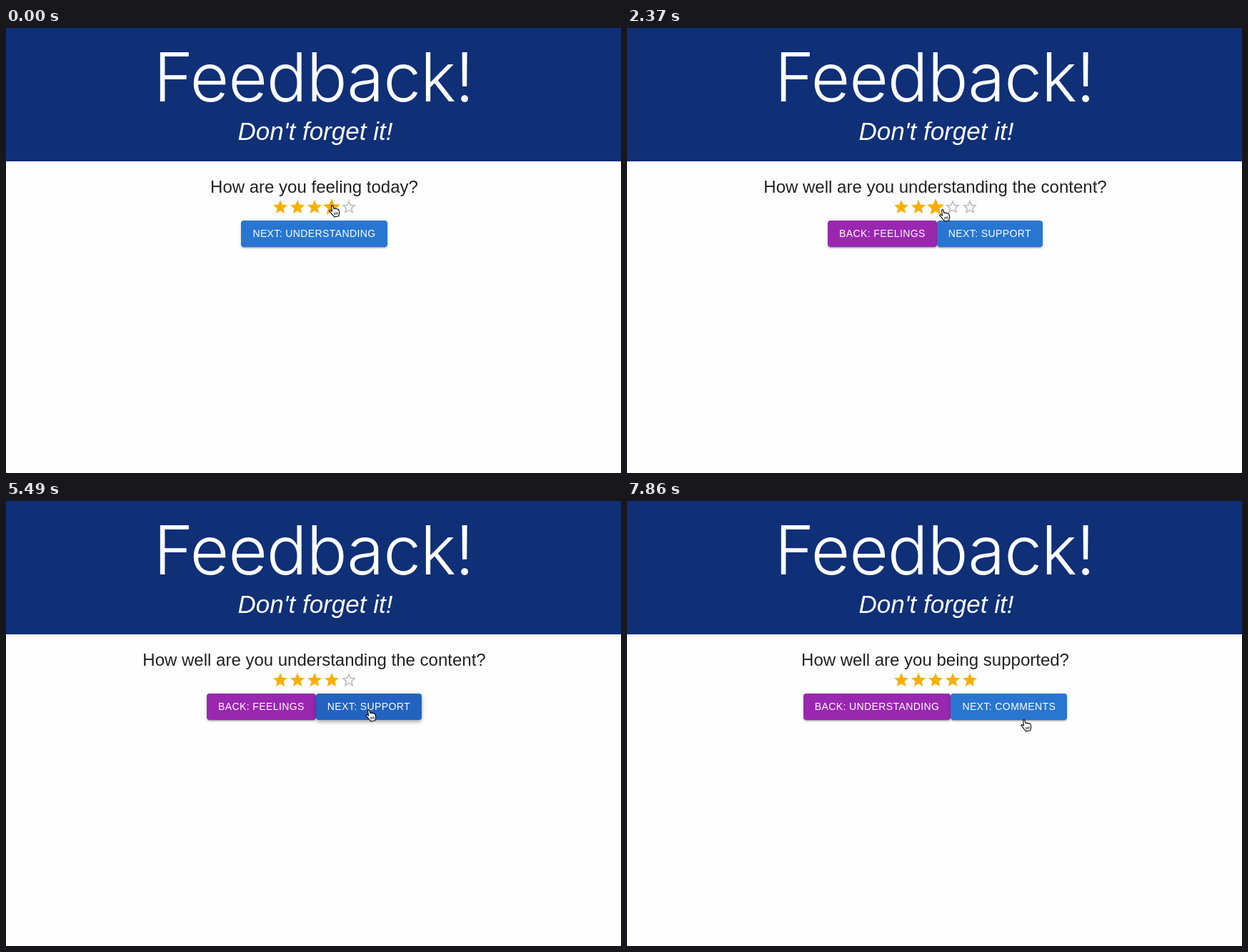
An HTML page for the animation above (8000 ms loop, 861 px wide and 624 px high).

```html
<!DOCTYPE html>
<html lang="en">
<head>
<meta charset="utf-8">
<title>Feedback</title>
<style>
  html, body { margin: 0; width: 100%; height: 100%; overflow: hidden; background: #fefefe; }
  #stage { position: relative; width: 861px; height: 624px; overflow: hidden; }
  svg { position: absolute; left: 0; top: 0; }
  text { text-anchor: middle; font-family: "Liberation Sans", Arial, sans-serif; }
  .title { font: 300 94.5px Inter, sans-serif; font-optical-sizing: none; letter-spacing: -1.1px; }
  .tagline { font-size: 35px; font-style: italic; }
  .question { font-size: 24px; }
  #buttons { position: absolute; left: 1px; top: 270px; width: 861px; display: flex; justify-content: center; }
  .button {
    --rest: #2876d2; --dark: #2363c0;
    box-sizing: border-box; height: 36.5px; padding: 6px 16px; border-radius: 4px;
    font: 14px/24.5px "Liberation Sans", Arial, sans-serif;
    letter-spacing: .4px; white-space: pre; color: #fff; background: var(--rest);
    box-shadow: 0 3px 1px -2px #0003, 0 2px 2px #00000024, 0 1px 5px #0000001f;
  }
  .button.lit {
    background: var(--dark);
    box-shadow: 0 2px 4px -1px #0003, 0 4px 5px #00000024, 0 1px 10px #0000001f;
  }
  .button:empty { display: none; }
  #back { --rest: #9a27b0; --dark: #8a22a5; }
</style>
</head>
<body>
<div id="stage">
  <svg width="861" height="624">
    <rect width="861" height="187" fill="#0f2f77"/>
    <text class="title" x="430.5" y="103" fill="#fff">Feedback!</text>
    <text class="tagline" x="433" y="157" fill="#fff">Don't forget it!</text>
    <text class="question" id="question" x="431.5" y="231" fill="#212121"></text>
    <g id="stars"></g>
  </svg>
  <div id="buttons">
    <div class="button" id="back"></div>
    <div class="button" id="next"></div>
  </div>
  <svg width="861" height="624">
    <g id="hand" stroke="#000" stroke-width="1.1" stroke-linejoin="round">
      <path fill="#fff" d="M-1.4 2.2c-.5-1.5 1.6-2.1 2.1-.7l1.5 4.2c.2-1 2-1 2.4.2c.4-.9 1.9-.8 2.2.4c.5-.6 1.7-.4 2 .8l.8 3.2c.4 1.7-.5 2.6-.6 4.1l-.1 1.3-6.3 1.3-.6-1.2c-1.3-1-2.6-2.3-3.6-4.1l-2.3-2.4c-1-1 .3-2.1 1.4-1.6l2 1.4z"/>
      <path fill="none" stroke-width=".9" d="M2.6 11l.6 3.2M4.6 10.6l.6 3.2M6.6 10.2l.6 3.2"/>
    </g>
    <path id="arrow" fill="#000" stroke="#fff" d="M0 0v15.5l3.6-3.3 2.5 5.6 2.7-1.1-2.4-5.5h5z"/>
  </svg>
</div>
<script>
const LOOP = 8000, STEP = 148.3;
const STAR = 24, STARS_LEFT = 372, STARS_TOP = 239;

const pages = [
  { question: "How are you feeling today?", back: "", next: "NEXT: UNDERSTANDING" },
  { question: "How well are you understanding the content?", back: "BACK: FEELINGS", next: "NEXT: SUPPORT" },
  { question: "How well are you being supported?", back: "BACK: UNDERSTANDING", next: "NEXT: COMMENTS" }
];

// Places the pointer travels between; it rests there from "t" until "until".
const stops = [
  { t: 0, x: 457, y: 248 },
  { t: 450, until: 1190, x: 460, y: 279 },
  { t: 1630, x: 389, y: 250 },
  { t: 2370, x: 442, y: 254 },
  { t: 2670, until: 2970, x: 457, y: 251 },
  { t: 3560, x: 448, y: 259 },
  { t: 3860, until: 4010, x: 496, y: 327 },
  { t: 4600, until: 5640, x: 508, y: 292 },
  { t: 6230, x: 383, y: 268 },
  { t: 6380, x: 385, y: 251 },
  { t: 7130, until: 7270, x: 479, y: 251 },
  { t: 7570, x: 545, y: 391 },
  { t: 7860, x: 556, y: 306 }
];
const clicks = [590, 2370, 2800, 5740, 7200];

const fullStar = "M12 17.27L18.18 21l-1.64-7.03L22 9.24l-7.19-.61L12 2 9.19 8.63 2 9.24l5.46 4.73L5.82 21z";
const emptyStar = "M22 9.24l-7.19-.62L12 2 9.19 8.63 2 9.24l5.46 4.73L5.82 21 12 17.27 18.18 21l-1.63-7.03L22 9.24zM12 15.4l-3.76 2.27 1-4.28-3.32-2.88 4.38-.38L12 6.1l1.71 4.04 4.38.38-3.32 2.88 1 4.28L12 15.4z";

const el = id => document.getElementById(id);
const buttons = [el("back"), el("next")];
const stars = Array.from({ length: 5 }, () =>
  el("stars").appendChild(document.createElementNS("http://www.w3.org/2000/svg", "path")));

function pointer(t) {
  const i = Math.max(0, stops.findLastIndex(stop => stop.t <= t));
  const from = stops[i], to = stops[i + 1] || from;
  const leave = from.until ?? from.t;
  const f = Math.min(1, Math.max(0, (t - leave) / (to.t - leave || 1)));
  const ease = f * f * (3 - 2 * f);
  return {
    x: Math.round(from.x + (to.x - from.x) * ease),
    y: Math.round(from.y + (to.y - from.y) * ease)
  };
}

// Number of the star under the pointer, or 0.
function starAt({ x, y }, height = STAR) {
  const n = Math.floor((x - STARS_LEFT) / STAR) + 1;
  const inRow = y >= STARS_TOP && y < STARS_TOP + height;
  return inRow && n >= 1 && n <= stars.length ? n : 0;
}

function isOver(button, { x, y }) {
  const box = button.getBoundingClientRect();
  return x >= box.left && x < box.right && y >= box.top && y <= box.bottom;
}

// A click on a star rates the page; any other click opens the next page.
function formAt(t) {
  let page = 0, rating = 4;
  for (const click of clicks.filter(c => c <= t)) {
    const star = starAt(pointer(click));
    if (!star) page++;
    rating = star || 1;
  }
  return { page: pages[page], rating };
}

function drawStars(count, enlarged) {
  stars.forEach((star, i) => {
    const full = i < count, scale = i + 1 === enlarged ? 1.2 : 1;
    const x = STARS_LEFT + STAR * (i + .5), y = STARS_TOP + STAR / 2;
    star.setAttribute("d", full ? fullStar : emptyStar);
    star.setAttribute("fill", full ? "#faaf00" : "#bdbdbd");
    star.setAttribute("transform", `translate(${x} ${y}) scale(${scale}) translate(-12 -12)`);
  });
}

function drawCursor(tip) {
  const shape = starAt(tip) || buttons.some(b => isOver(b, tip)) ? "hand" : "arrow";
  for (const id of ["hand", "arrow"]) {
    el(id).style.display = id === shape ? "" : "none";
    el(id).setAttribute("transform", `translate(${tip.x} ${tip.y})`);
  }
}

function draw(t) {
  const { page, rating } = formAt(t);
  const tip = pointer(t), earlier = pointer(t - STEP);
  const hovered = starAt(tip, STAR - 5);

  el("question").textContent = page.question;
  for (const button of buttons) button.textContent = page[button.id];
  // Button highlights trail the pointer by one step.
  for (const button of buttons) button.classList.toggle("lit", isOver(button, earlier));
  drawStars(hovered || rating, hovered);
  drawCursor(tip);
}

let shown = -1;
const start = performance.now();
function tick() {
  const time = (performance.now() - start) % LOOP;
  const step = Math.floor((time + 4) / STEP);
  if (step !== shown) draw((shown = step) * STEP);
  requestAnimationFrame(tick);
}
tick();
</script>
</body>
</html>
```
